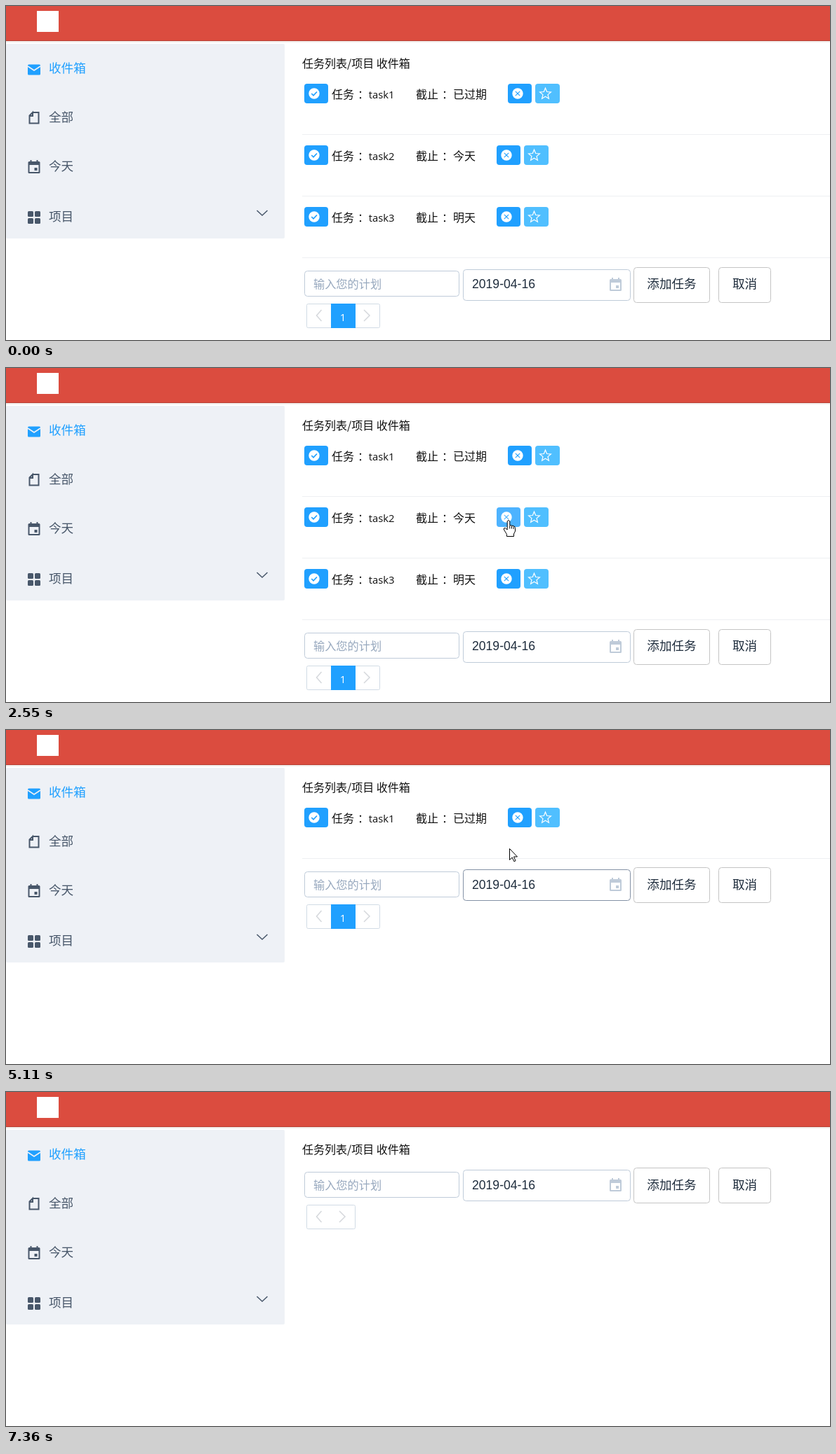
An HTML page with a canvas that plays this animation: 1174x477 px, repeating every 7.83 s.

```html
<!DOCTYPE html>
<html lang="zh-CN">
<head>
<meta charset="utf-8">
<title>任务列表</title>
<style>
html, body { margin: 0; width: 100%; height: 100%; overflow: hidden; background: #fff; }
canvas { display: block; }
</style>
</head>
<body>
<canvas id="stage" width="1174" height="477"></canvas>
<script>
const ctx = document.getElementById('stage').getContext('2d');
const LOOP = 7830, STEP = 77.5, ROW_PITCH = 88.2;
const CJK = '"Noto Sans CJK SC", "Noto Sans CJK", sans-serif';
const LATIN = '"Open Sans", "Noto Sans", sans-serif';
const ARIAL = '"Liberation Sans", Arial, sans-serif';
const BLUE = '#20a0ff', SLATE = '#48576a', INK = '#1f2d3d', PALE = '#bfcbd9';

// Pointer path: step, x, y and, where it differs from the hit test, the cursor shape.
const PATH = [
  [9, 998, 466], [16, 853, 387], [19, 798, 338], [28, 716, 217], [44, 716, 217],
  [47, 727, 190], [49, 727, 190], [52, 720, 208], [61, 720, 208, 'hand'],
  [63, 720, 208, 'beam'], [65, 718, 187], [66, 717, 169], [70, 719, 121],
  [79, 719, 121, 'hand'], [80, 730, 131, 'beam'], [83, 759, 157, 'beam'],
  [84, 795, 185], [89, 1057, 370], [94, 1098, 466], [95, 1100, 477]
];
const PRESSES = [32, 55, 73];
const DUE = { 1: '已过期', 2: '今天', 3: '明天' };

const ARROW = new Path2D('M.5 .5V16.5L4.2 13 6.8 18.7 9 17.8 6.5 12H11.5Z');
const HAND = new Path2D('M-1.8 1.8Q0-1 1.8 1.8V7.5L7.6 8.8Q9.5 9.5 9.5 11.5V16L7.5 20V23.5H-2.5V20.5L-6.5 14Q-7.5 11-4.5 11.5L-1.8 14Z');
const KNUCKLES = new Path2D('M1.8 8V12.5M4.5 9V12.5M7.2 9.5V13');

function text(str, x, y, size, color, family = CJK, align = 'left') {
  ctx.font = `${size}px ${family}`;
  ctx.fillStyle = color;
  ctx.textAlign = align;
  ctx.fillText(str, x, y);
}

function box(x, y, w, h, r, fill, stroke) {
  const inset = stroke ? 0.5 : 0;
  ctx.beginPath();
  ctx.roundRect(x + inset, y + inset, w - 2 * inset, h - 2 * inset, r);
  if (fill) { ctx.fillStyle = fill; ctx.fill(); }
  if (stroke) { ctx.strokeStyle = stroke; ctx.lineWidth = 1; ctx.stroke(); }
}

function rect(x, y, w, h, color) {
  ctx.fillStyle = color;
  ctx.fillRect(x, y, w, h);
}

function disc(x, y, r, color) {
  ctx.beginPath();
  ctx.arc(x, y, r, 0, 2 * Math.PI);
  ctx.fillStyle = color;
  ctx.fill();
}

function line(color, width, ...points) {
  ctx.beginPath();
  points.forEach(([x, y]) => ctx.lineTo(x, y));
  ctx.strokeStyle = color;
  ctx.lineWidth = width;
  ctx.stroke();
}

function cross(x, y, r, color, width) {
  line(color, width, [x - r, y - r], [x + r, y + r]);
  line(color, width, [x + r, y - r], [x - r, y + r]);
}

function calendar(x, y, color, inside) {
  box(x, y + 2, 17, 17, 1.5, color);
  rect(x + 3, y, 2, 3, color);
  rect(x + 12, y, 2, 3, color);
  rect(x + 2, y + 7, 13, 10, inside);
  rect(x + 9, y + 11, 4, 4, color);
}

function star(x, y) {
  ctx.beginPath();
  for (let i = 0; i < 10; i++) {
    const r = i % 2 ? 3.7 : 8.3, a = i * Math.PI / 5 - Math.PI / 2;
    ctx.lineTo(x + r * Math.cos(a), y + r * Math.sin(a));
  }
  ctx.closePath();
  ctx.strokeStyle = '#fff';
  ctx.lineWidth = 1.2;
  ctx.stroke();
}

function drawFrame() {
  rect(0, 0, 1174, 477, '#fff');
  rect(0, 0, 1174, 49, '#db4c3f');
  rect(0, 49, 1174, 1, '#b8392e');
  rect(0, 50, 1174, 2, '#f1ebe9');
  rect(44, 7, 31, 30, '#fff');

  box(0, 54, 397, 278, 2, '#eef1f6');
  ['收件箱', '全部', '今天', '项目'].forEach((label, i) =>
    text(label, 61, [95, 165, 235, 307][i], 17.6, i ? SLATE : BLUE));
  box(31, 83.5, 18, 15, 1.5, BLUE);
  line('#eef1f6', 1.6, [31, 86], [40, 92], [49, 86]);
  line(SLATE, 2, [38, 152], [46.5, 152], [46.5, 167.5], [33.5, 167.5], [33.5, 156.5], [38, 152], [38, 157], [33.5, 157]);
  calendar(31.5, 220, SLATE, '#eef1f6');
  for (const x of [31, 41]) for (const y of [293, 303]) box(x, y, 8, 8, 1.5, SLATE);
  line(SLATE, 1.5, [357.5, 292], [365, 299], [372.5, 292]);

  text('任务列表/项目 收件箱', 422, 88, 16, '#111');
}

function field(label, x, y) {
  text(label, x, y, 16, '#111');
  text('：', x + 37, y, 16, '#111');
}

function drawRow(id, index, n, over) {
  const y = Math.round(111 + ROW_PITCH * index), mid = y + 14, base = y + 21;
  const x = id === 1 ? 715 : 699;
  const focused = index === 1 && n >= 33;
  const hot = over(x, y, 34, 28);
  const pressed = hot && PRESSES.includes(n);

  box(425, y, 34, 28, 4, BLUE);
  disc(439, mid, 7.7, '#fff');
  line(BLUE, 1.7, [435.3, mid], [438, mid + 2.8], [443, mid - 2.5]);
  field('任务', 464, base);
  text('task' + id, 516.7, base, 14.8, '#111', LATIN);
  field('截止', 584, base);
  text(DUE[id], 637, base, 16, '#111');

  const fill = pressed ? '#1d90e6' : hot || focused ? '#4db3ff' : BLUE;
  box(x, y, 34, 28, 4, fill);
  disc(x + 14, mid, 7.7, '#fff');
  cross(x + 14, mid, 3.2, fill, 1.1);
  box(x + 39, y, 35, 28, 4, over(x + 39, y, 35, 28) ? '#73ccff' : '#50bfff');
  star(x + 53.5, mid + 0.5);

  rect(422, Math.round(183 + ROW_PITCH * index), 752, 1, '#eef0f2');
}

function formButton(label, x, y, w, base, over) {
  const hot = over(x, y, w, 51);
  box(x, y, w, 51, 4, '#fff', hot ? BLUE : '#c4c4c4');
  text(label, x + w / 2, base, 17.6, hot ? BLUE : INK, CJK, 'center');
}

function drawForm(rows, n, p, over) {
  const snap = y => Math.round(y + ROW_PITCH * rows);
  const focus = (n >= 63 && n <= 66) || (n >= 80 && n <= 83);
  const date = snap(111), button = snap(108), base = snap(138.8);

  box(425, snap(113.8), 221, 37, 4, '#fff', PALE);
  text('输入您的计划', 438, base, 16.2, '#97a8be');
  box(651, date, 239, 45, 4, '#fff', focus ? '#8391a5' : PALE);
  text('2019-04-16', 664, base, 17.6, INK, ARIAL);
  const onIcon = p && p.x >= 852 && p.x < 890 && p.y > date && p.y < date + 45;
  if (onIcon) cross(869, date + 22, 8, PALE, 2.6);
  else calendar(860, date + 12, PALE, '#fff');
  formButton('添加任务', 894, button, 109, base, over);
  formButton('取消', 1015, button, 75, base, over);

  const top = snap(160.8), mid = top + 17, next = rows ? 514 : 479;
  box(428, top, rows ? 105 : 70, 35, 2, '#fff', '#d1dbe5');
  line('#d5d8dc', 1.5, [449.5, mid - 8], [442.5, mid], [449.5, mid + 8]);
  line('#d5d8dc', 1.5, [next - 4, mid - 8], [next + 4, mid], [next - 4, mid + 8]);
  if (rows) {
    rect(463, top, 35, 35, BLUE);
    text('1', 480, top + 25, 15, '#fff', LATIN, 'center');
  }
}

function pointerAt(n) {
  const i = PATH.findIndex(key => key[0] > n) - 1;
  if (i < 0) return null;
  const [n0, x0, y0, shape] = PATH[i], [n1, x1, y1] = PATH[i + 1];
  const k = (n - n0) / (n1 - n0);
  return { x: Math.round(x0 + (x1 - x0) * k), y: Math.round(y0 + (y1 - y0) * k), shape };
}

function drawPointer({ x, y }, shape) {
  ctx.save();
  ctx.translate(x, y);
  if (shape === 'beam') {
    line('#000', 1, [0.5, -7], [0.5, 7]);
    for (const end of [-7.5, 7.5]) {
      line('#000', 1, [-3, end], [0, end]);
      line('#000', 1, [1, end], [4, end]);
    }
  } else {
    const path = shape === 'hand' ? HAND : ARROW;
    ctx.fillStyle = '#fff';
    ctx.strokeStyle = '#000';
    ctx.lineWidth = 1;
    ctx.fill(path);
    ctx.stroke(path);
    if (shape === 'hand') ctx.stroke(KNUCKLES);
  }
  ctx.restore();
}

function render(now) {
  const n = Math.floor((now % LOOP + 20) / STEP);
  const p = pointerAt(n);
  let overButton = false;
  const over = (x, y, w, h) => {
    const hit = !!p && p.x >= x && p.x < x + w && p.y >= y && p.y < y + h;
    overButton ||= hit;
    return hit;
  };
  const tasks = n < 38 ? [1, 2, 3] : n < 61 ? [1, 3] : n < 79 ? [1] : [];
  drawFrame();
  tasks.forEach((id, i) => drawRow(id, i, n, over));
  drawForm(tasks.length, n, p, over);
  if (p) drawPointer(p, p.shape || (overButton ? 'hand' : 'arrow'));
}

let start;
function tick(now) {
  start ??= now;
  render(now - start);
  requestAnimationFrame(tick);
}
requestAnimationFrame(tick);
</script>
</body>
</html>
```
